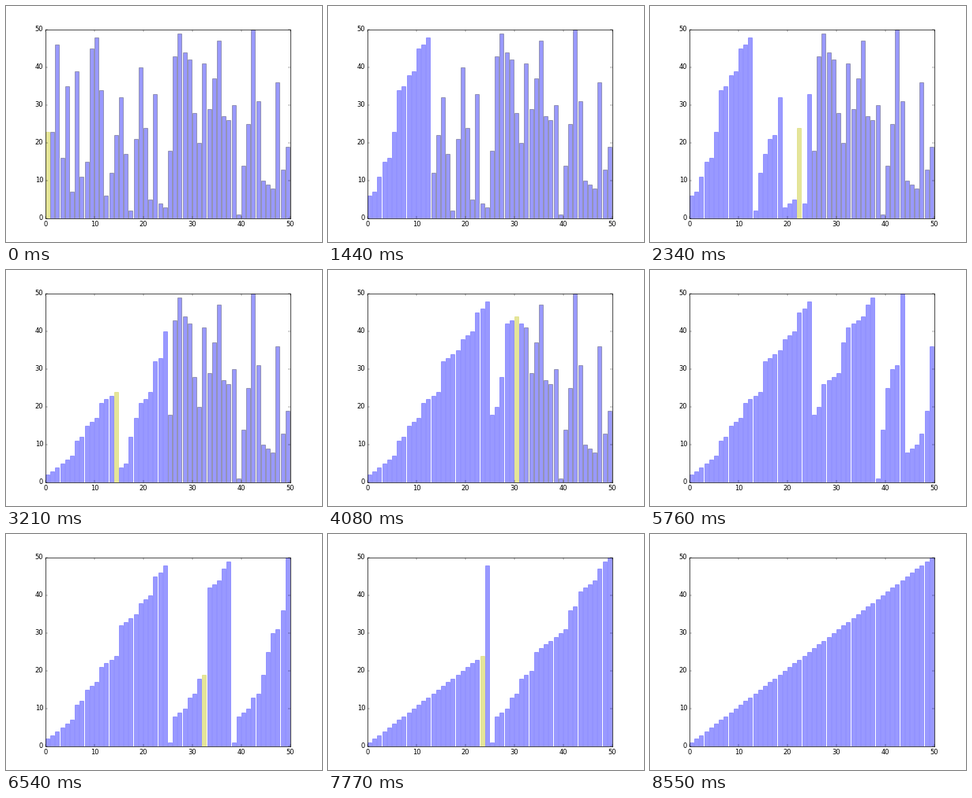
Write a matplotlib script that moves like this. It is 400 px wide and 300 px high and loops after 8580 ms.

```python
"""Merge sort drawn as a bar chart, one frame per write."""
import matplotlib.pyplot as plt
from matplotlib.animation import FuncAnimation

plt.style.use("classic")
plt.rcParams.update({
    "font.family": "DejaVu Sans",
    "figure.facecolor": "white",
    "savefig.facecolor": "white",
    "savefig.dpi": "figure",
})

VALUES = [38, 23, 46, 16, 35, 7, 39, 11, 15, 45, 48, 34, 6,
          12, 22, 32, 17, 2, 21, 40, 24, 5, 33, 4, 3,
          18, 43, 49, 44, 42, 28, 20, 41, 29, 37, 47, 27, 26,
          30, 1, 14, 25, 50, 31, 10, 9, 8, 36, 13, 19]
N = len(VALUES)
ALPHA = 0.4


def merge_sort(a, lo, hi):
    """Sort a[lo:hi] in place, yielding (index, is_last) after each write."""
    if hi - lo < 2:
        return
    mid = (lo + hi + 1) // 2
    yield from merge_sort(a, lo, mid)
    yield from merge_sort(a, mid, hi)
    for k, value in enumerate(sorted(a[lo:hi]), lo):
        a[k] = value
        yield k, k == hi - 1


def record(values):
    """List of (heights, visited bars, marked bar or None)."""
    a, visited, steps = list(values), set(), []
    for k, is_last in merge_sort(a, 0, len(a)):
        visited.add(k)
        steps.append((a[:], frozenset(visited), None if is_last else k))
    return steps


steps = record(VALUES)

fig = plt.figure(figsize=(8, 6), dpi=50)
ax = fig.add_axes([0.125, 0.1, 0.775, 0.8])
bars = ax.bar(range(N), VALUES, width=0.8, align="edge",
              color="b", edgecolor="k", alpha=ALPHA)
ax.set(xlim=(0, N), ylim=(0, N),
       xticks=range(0, N + 1, 10), yticks=range(0, N + 1, 10))


def draw(i):
    heights, visited, marked = steps[i]
    for k, bar in enumerate(bars):
        bar.set_height(heights[k])
        bar.set_facecolor("y" if k == marked else "b")
        # Bars keep a black outline until they are first written.
        bar.set_edgecolor("y" if k == marked else "b" if k in visited else "k")
    return list(bars)


anim = FuncAnimation(fig, draw, frames=len(steps), interval=30,
                     repeat=True, repeat_delay=0)
plt.show()
```
